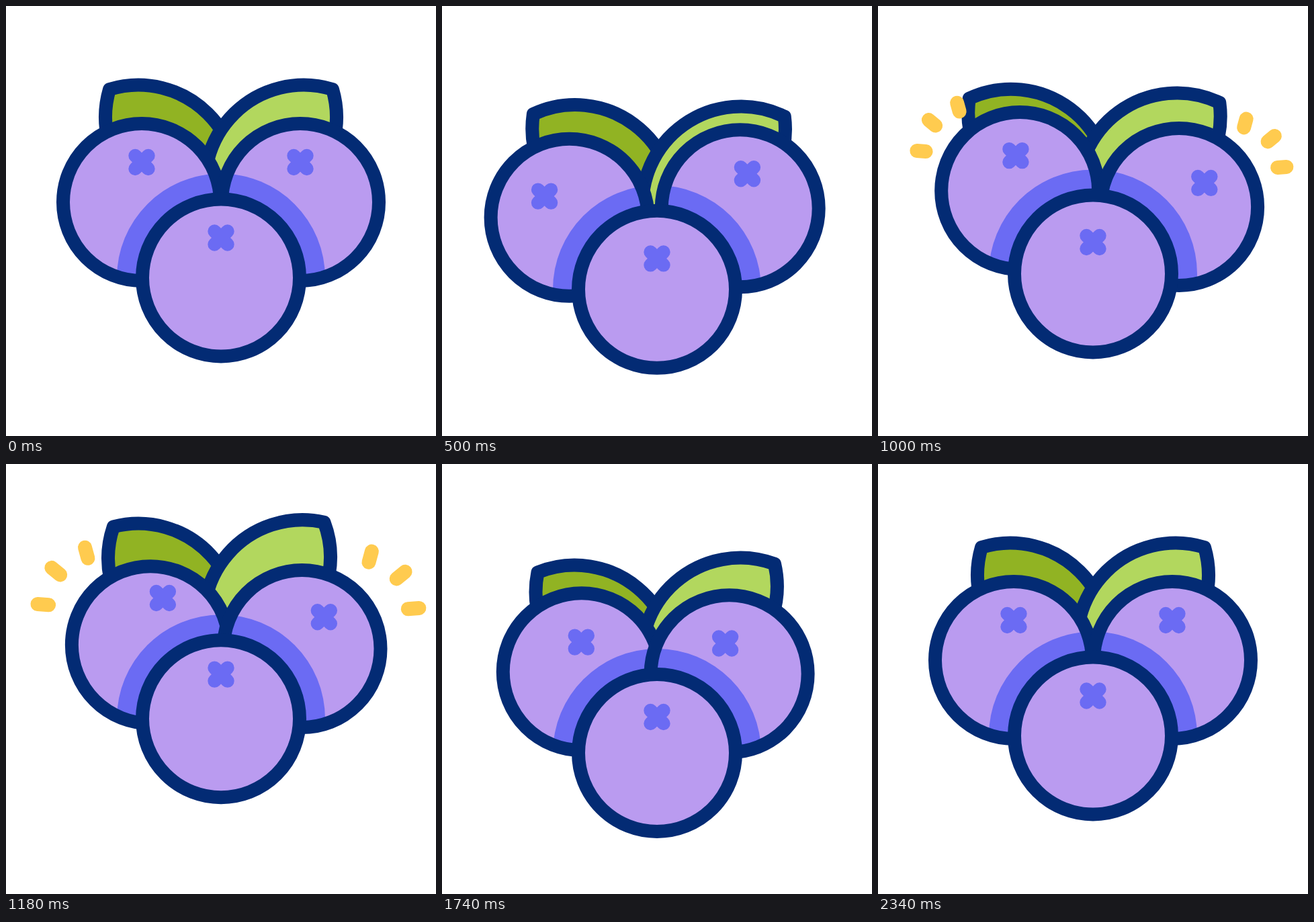
Recreate the animation shown at these times as an HTML page. Size 640 px wide and 640 px high, loop 2400 ms.

```html
<!DOCTYPE html>
<html lang="en">
<head>
<meta charset="utf-8">
<title>Berries</title>
<style>
  html, body { margin: 0; width: 100%; height: 100%; overflow: hidden; background: #fff; }
  svg { display: block; width: 100%; height: 100%; }
  .line { stroke: #032b74; stroke-width: 20; stroke-linejoin: round; }
  .skin { fill: #ba9bf0; }
  .shade { fill: #6b6bf3; }
  .mark { stroke: #6b6bf3; stroke-width: 20; stroke-linecap: round; }
  .spark { stroke: #ffcb4f; stroke-width: 21; stroke-linecap: round; }
</style>
</head>
<body>
<svg id="stage" viewBox="0 0 640 640"></svg>
<script>
const LOOP = 2400, R = 117, FRONT_Y = 404.5, SIDE_Y = 292, MARK_Y = -59.5;
const MIRROR = 'matrix(-1 0 0 1 640 0)';
const stage = document.getElementById('stage');

// One hop shared by all parts: squat, top, landing, rest.
const BEATS = [670, 1250, 1680, 2200];

const ramp = (t, a, b) => Math.max(0, Math.min(1, (t - a) / (b - a)));
const smooth = u => u * u * (3 - 2 * u);

// Eases an offset through the hop; each part starts and lags on its own.
function hop(start, lag, squat, top, land) {
  const times = [start, ...BEATS.map(b => b + lag)];
  const steps = [0, squat, top, land, 0];
  return t => {
    let v = 0;
    for (let i = 0; i < 4; i++) {
      v += (steps[i + 1] - steps[i]) * smooth(ramp(t, times[i], times[i + 1]));
    }
    return v;
  };
}

function hop2(start, lag, ...poses) {
  const x = hop(start, lag, ...poses.map(p => p[0]));
  const y = hop(start, lag, ...poses.map(p => p[1]));
  return t => [x(t), y(t)];
}

const still = () => 0;
const frontHop = hop(240, 0, 26.5, -27.5, 26.5);
const frontRoll = hop(150, 130, 24.3, -18.2, 7.9);

function set(el, attrs) {
  for (const k in attrs) el.setAttribute(k, attrs[k]);
}

function add(parent, tag, attrs = {}) {
  const el = document.createElementNS('http://www.w3.org/2000/svg', tag);
  set(el, attrs);
  return parent.appendChild(el);
}

const move = (x, y) => `translate(${x} ${y})`;

// A lens of two equal arcs that swings about a pivot.
function makeLeaf(fill, flip, pivotY, lift, swing) {
  const side = add(stage, 'g', flip ? { transform: MIRROR } : {});
  const el = add(side, 'path', {
    class: 'line', fill, d: 'M338 306A147 147 0 0 0 154 124A147 147 0 0 0 338 306Z'
  });
  return t => set(el, { transform: `${move(0, lift(t))} rotate(${swing(t)} 284 ${pivotY})` });
}

function makeBerry(id, x, y, path, roll, shaded) {
  const g = add(stage, 'g');
  const clip = add(g, 'clipPath', { id });
  add(clip, 'circle', { r: R });
  add(g, 'circle', { r: R, class: 'skin' });
  const shade = shaded && add(g, 'g', { 'clip-path': `url(#${id})` });
  const shadow = shaded && add(shade, 'circle', { r: 155, class: 'shade' });
  add(g, 'circle', { r: R, class: 'line', fill: 'none' });
  const mark = add(g, 'path', { class: 'mark', d: 'M-9.7-9.7L9.7 9.7M9.7-9.7L-9.7 9.7' });
  return t => {
    const [dx, dy] = path(t), [mx, my] = roll(t);
    set(g, { transform: move(x + dx, y + dy) });
    set(mark, { transform: move(mx, MARK_Y + my) });
    if (shaded) set(shadow, { cx: 320 - x - dx, cy: FRONT_Y + frontHop(t) - y - dy });
  };
}

// Three strokes fanned 35 degrees apart that shoot out and shrink away.
function makeSparks(x, side, path) {
  const g = add(stage, 'g');
  const rays = [[-140, -58.5], [-125.5, -97], [-90, -118]].map(([px, py], i) => {
    const a = (4.3 + 35.2 * i) * Math.PI / 180;
    return { px, py, dx: -Math.cos(a), dy: -Math.sin(a), el: add(g, 'line', { class: 'spark' }) };
  });
  return t => {
    const [dx, dy] = path(t);
    const head = 32 * ramp(t, 836, 1230) + 0.01, tail = 32 * ramp(t, 1044, 1430);
    set(g, {
      visibility: t >= 830 && t < 1430 ? 'visible' : 'hidden',
      transform: `${move(x + dx, SIDE_Y + dy)} scale(${side} 1)`
    });
    for (const r of rays) {
      set(r.el, {
        x1: r.px + r.dx * tail, y1: r.py + r.dy * tail,
        x2: r.px + r.dx * head, y2: r.py + r.dy * head
      });
    }
  };
}

const leftPath = hop2(110, -110, [-13, 24], [13, -24], [7.7, 23]);
const leftRoll = hop2(120, 0, [-48, 36], [21.3, -12], [-0.5, 16]);
const rightPath = hop2(330, 90, [16.5, 27], [-0.7, -27], [-10.5, 21]);
const rightRoll = hop2(330, 160, [40, 29.5], [29, 3], [-11.6, 16]);

const parts = [
  makeLeaf('#91b323', false, 263, frontHop, hop(150, 130, -14.4, 8.7, -6)),
  makeLeaf('#b2d75e', true, 284, hop(250, 40, 31.5, -34, 17), hop(150, 130, -16.4, 12.2, -4.5)),
  makeBerry('left', 202, SIDE_Y, leftPath, leftRoll, true),
  makeBerry('right', 438, SIDE_Y, rightPath, rightRoll, true),
  makeBerry('front', 320, FRONT_Y, t => [0, frontHop(t)], t => [0, frontRoll(t)], false),
  makeSparks(202, 1, leftPath),
  makeSparks(444.5, -1, rightPath)
];

const draw = t => parts.forEach(update => update(t));

let start = null;
function tick(now) {
  if (start === null) start = now;
  draw((now - start) % LOOP);
  requestAnimationFrame(tick);
}
draw(0);
requestAnimationFrame(tick);
</script>
</body>
</html>
```
